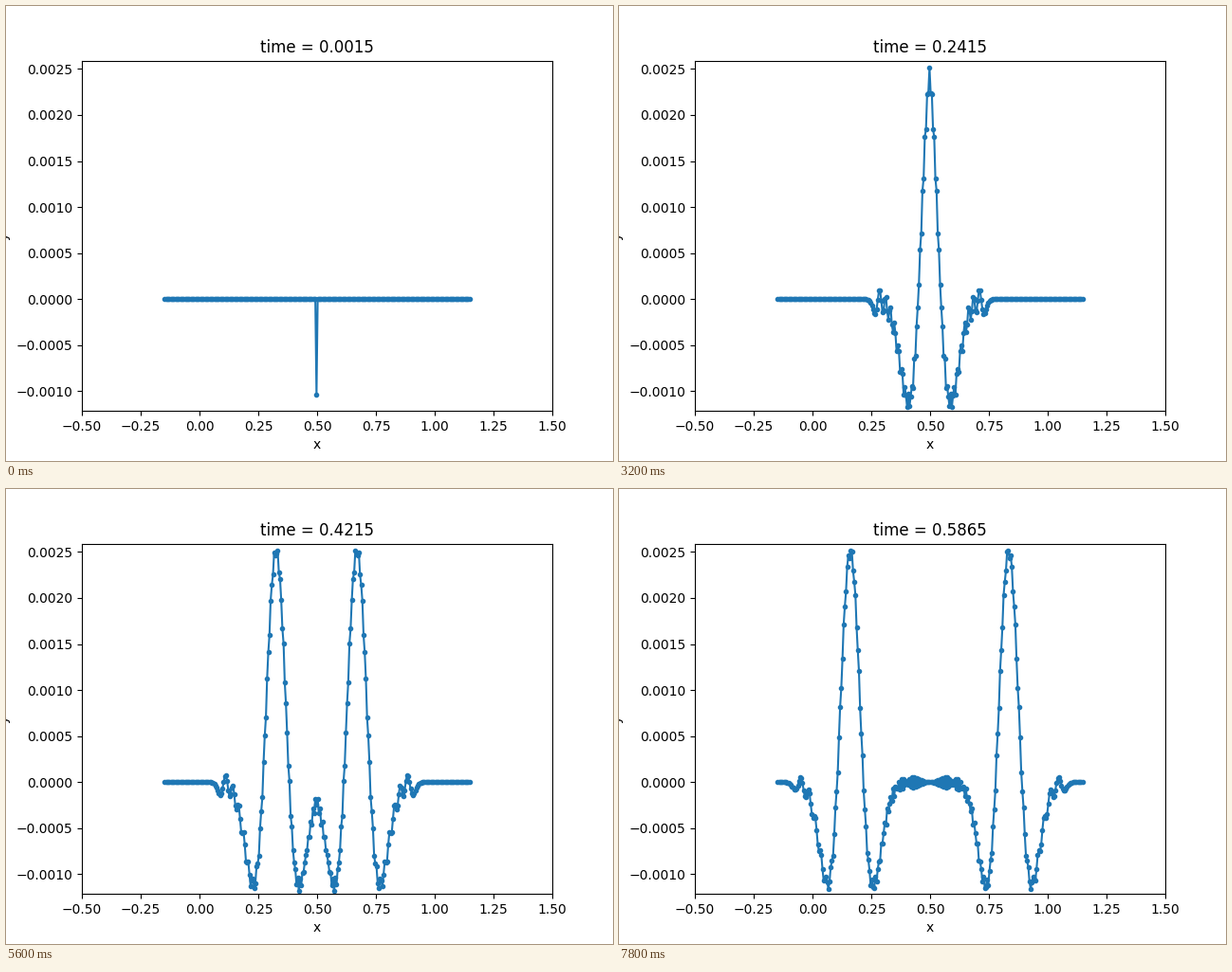
A matplotlib script that plays this animation: 640 px wide and 480 px high, repeating every 8000 ms.

```python
import numpy as np
import matplotlib.pyplot as plt
from matplotlib.animation import FuncAnimation

DX, DT = 0.005, 0.0015
N = 260                  # cells on [-0.15, 1.15]
SRC = 129                # cell that emits the pulse
FREQ, DELAY = 4.0, 0.25
KICK = -1.042e-3         # pressure left by the abrupt start
FRAMES, STEPS = 40, 10   # leapfrog steps per frame
PAD, SIGMA = 0.15, 60.0  # absorbing layer

edges = -PAD + DX * np.arange(N + 1)
x = edges[:-1] + DX / 2


def ricker(t):
    a = (np.pi * FREQ * (t - DELAY)) ** 2
    return (1 - 2 * a) * np.exp(-a)


def damping(pos):
    depth = np.maximum(0, np.maximum(-pos, pos - 1)) / PAD
    return np.exp(-SIGMA * depth ** 2 * DT)


def simulate():
    """Pressure on the staggered grid, one row per frame."""
    p, v = np.zeros(N), np.zeros(N + 1)
    damp_p, damp_v = damping(x), damping(edges)
    ratio = DT / DX
    p[SRC] = KICK
    rows = [p.copy()]
    for n in range(2, (FRAMES - 1) * STEPS + 2):
        v[1:-1] -= ratio * np.diff(p)
        v *= damp_v
        p -= ratio * np.diff(v)
        p *= damp_p
        p[SRC] += DT * ricker(n * DT)
        if n % STEPS == 1:
            rows.append(p.copy())
    return rows


waves = simulate()

fig, ax = plt.subplots(figsize=(6.4, 4.8), dpi=100)
line, = ax.plot(x, waves[0], ".-")
ax.set_xlim(-0.5, 1.5)
ax.set_ylim(-0.001215, 0.002591)
ax.set_xlabel("x")
ax.set_ylabel("y")
title = ax.set_title("")


def draw(i):
    line.set_ydata(waves[i])
    title.set_text(f"time = {DT * (1 + STEPS * i):.4f}")
    return line, title


anim = FuncAnimation(fig, draw, frames=FRAMES, interval=200, repeat=True,
                     repeat_delay=0, init_func=lambda: draw(0))
plt.show()
```
